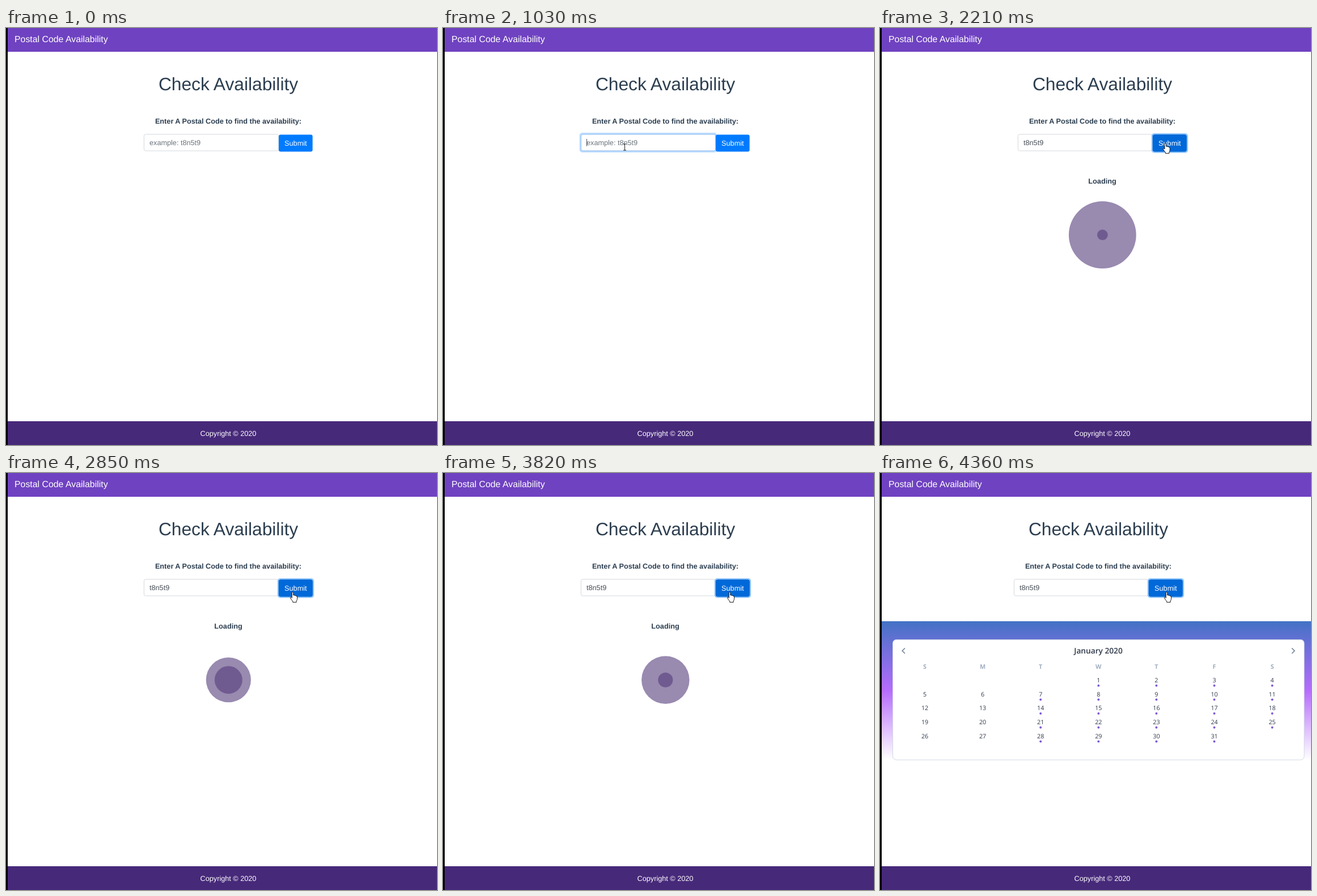
Recreate the animation shown at these times as an HTML page with a canvas. Size 760 by 737 pixels, loop 4410 ms.

```html
<!DOCTYPE html>
<html lang="en">
<head>
<meta charset="utf-8">
<title>Postal Code Availability</title>
<style>
  html, body { margin: 0; width: 100%; height: 100%; overflow: hidden; background: #fff; }
  canvas { display: block; }
</style>
</head>
<body>
<canvas id="stage" width="760" height="737"></canvas>
<script>
const ctx = document.getElementById('stage').getContext('2d');
const LOOP = 4410;
const ZOOM = 0.793;
const SANS = '"Liberation Sans", Arial, sans-serif';
const CALENDAR_FONT = '"Open Sans", "Noto Sans", sans-serif';
const INK = '#2c3e50';
const CODE = 't8n5t9';

// Moments of the story, in ms
const FOCUS = 640, TYPE = 1060, KEY = 42, LEAVE = 1310, PRESS = 1790, LOAD = 1922, RESULT = 3822;

const clamp = v => Math.min(1, Math.max(0, v));
const ramp = (t, a, b) => clamp((t - a) / (b - a));
const mix = (a, b, p) => a + (b - a) * p;
const smooth = p => p * p * (3 - 2 * p);

// CSS ease-in-out: cubic-bezier(.42, 0, .58, 1)
function easeInOut(x) {
  let lo = 0, hi = 1, s = 0.5;
  for (let i = 0; i < 20; i++) {
    s = (lo + hi) / 2;
    const bx = 1.26 * s * (1 - s) ** 2 + 1.74 * s * s * (1 - s) + s ** 3;
    if (bx < x) lo = s; else hi = s;
  }
  return s * s * (3 - 2 * s);
}

function rect(x, y, w, h, color) {
  ctx.fillStyle = color;
  ctx.fillRect(x, y, w, h);
}

function roundBox(x, y, w, h, r, fill, stroke, line = 1) {
  ctx.beginPath();
  ctx.roundRect(x, y, w, h, r);
  if (fill) { ctx.fillStyle = fill; ctx.fill(); }
  if (stroke) { ctx.strokeStyle = stroke; ctx.lineWidth = line; ctx.stroke(); }
}

function circle(x, y, r, color) {
  ctx.fillStyle = color;
  ctx.beginPath();
  ctx.arc(x, y, r, 0, Math.PI * 2);
  ctx.fill();
}

function text(str, x, y, size, color, { weight = 400, align = 'center', family = SANS } = {}) {
  ctx.font = `${weight} ${size}px ${family}`;
  ctx.textAlign = align;
  ctx.fillStyle = color;
  ctx.fillText(str, x, y);
}

function polyline(points, color, width) {
  ctx.beginPath();
  points.forEach(([x, y]) => ctx.lineTo(x, y));
  ctx.strokeStyle = color;
  ctx.lineWidth = width;
  ctx.stroke();
}

function drawFrame() {
  rect(0, 0, 760, 737, '#fff');
  rect(3, 0, 757, 42, '#6f42c1');
  text('Postal Code Availability', 15, 25, 20 * ZOOM, '#fff', { align: 'left' });
  rect(3, 695, 757, 42, '#47297a');
  text('Copyright © 2020', 392, 721, 16 * ZOOM, '#fff');
  rect(0, 0, 3, 737, '#000');
}

function drawInput(t, x) {
  const focus = ramp(t, FOCUS, FOCUS + 140) * (1 - ramp(t, PRESS, PRESS + 140));
  if (focus) roundBox(x - 2.4, 185.1, 242.8, 34.8, 5, `rgba(0,123,255,${0.25 * focus})`);
  roundBox(x + 0.4, 187.9, 237.2, 29.2, 3, '#fff', '#ced4da', 0.9);
  if (focus) roundBox(x + 0.4, 187.9, 237.2, 29.2, 3, null, `rgba(128,189,255,${focus})`, 0.9);

  const typed = CODE.slice(0, Math.max(0, Math.floor((t - TYPE) / KEY)));
  text(typed || 'example: ' + CODE, x + 10, 207, 16 * ZOOM, typed ? '#495057' : '#6c757d', { align: 'left' });
  if (t > FOCUS && t < PRESS) {
    rect(x + 10 + (typed ? ctx.measureText(typed).width : 0), 196, 1, 13, '#495057');
  }
}

function drawButton(t, x, hover) {
  const focus = ramp(t, PRESS, PRESS + 140);
  if (focus) roundBox(x - 2.3, 186, 64.4, 34.8, 5, `rgba(38,143,255,${0.5 * focus})`);
  roundBox(x, 188.4, 59.6, 30, 3.2, hover ? '#0069d9' : '#007bff');
  if (hover) roundBox(x + 0.4, 188.8, 58.8, 29.2, 3, null, '#0062cc', 0.8);
  text('Submit', x + 29.8, 207.5, 16 * ZOOM, '#fff');
}

function drawForm(t, hover) {
  const shift = t < RESULT ? 0 : -7;
  text('Check Availability', 392 + shift, 110, 40 * ZOOM, INK);
  text('Enter A Postal Code to find the availability:', 392 + shift, 169, 16 * ZOOM, INK, { weight: 700 });
  drawInput(t, 243 + shift);
  drawButton(t, 481 + shift, hover);
}

// The second disc rests at full size until its one second delay is over
function drawLoader(t) {
  const age = t < 2210 ? t - LOAD : t < 2720 ? mix(288, 1340, ramp(t, 2210, 2720)) : t - 1380;
  const bounce = ms => {
    const phase = (ms / 1050) % 2;
    return easeInOut(phase < 1 ? phase : 2 - phase);
  };
  text('Loading', 392, 275, 16 * ZOOM, INK, { weight: 700 });
  for (const scale of [bounce(age), age < 1000 ? 1 : bounce(age - 1000)]) {
    circle(392.3, 365.7, 59.4 * scale, 'rgba(86,61,124,.6)');
  }
}

function drawCalendar(t) {
  const glow = ctx.createLinearGradient(0, 262, 0, 507);
  glow.addColorStop(0, '#4372c4');
  glow.addColorStop(0.5, '#b66cfc');
  glow.addColorStop(1, '#fff');
  rect(3, 262, 757, 245, glow);
  roundBox(22.5, 294.5, 725.5, 212.5, 6.3, '#fff', '#cbd5e0', 0.9);

  const style = { family: CALENDAR_FONT };
  text('January 2020', 385, 319, 13.7, '#2d3748', { ...style, weight: 600 });
  polyline([[44, 309.5], [39.2, 314.2], [44, 319]], '#718096', 1.6);
  polyline([[726.2, 309.5], [731, 314.2], [726.2, 319]], '#718096', 1.6);

  const column = c => 79 + 102.1 * c;
  [...'SMTWTFS'].forEach((d, c) => text(d, column(c), 345.5, 10.8, '#a0aec0', { ...style, weight: 700 }));
  for (let day = 1; day <= 31; day++) {
    const cell = day + 2, c = cell % 7, y = 366 + 24.65 * Math.floor(cell / 7);
    text(day, column(c), y + 4, 10.7, '#2d3748', { ...style, weight: 500 });
    if (c >= 2) circle(column(c), y + 9.8, 2, '#805ad5');
  }
  const veil = 1 - ramp(t, RESULT, RESULT + 538);
  rect(3, 262, 757, 250, `rgba(255,255,255,${veil})`);
}

const CURSORS = {
  arrow: 'M0 0V13L3 10.3L5 15L7 14.2L5 9.6H9.3Z',
  hand: 'M-1.3 1.6Q-1.2 .5 0 .5Q1.2 .5 1.3 1.6V6Q3 5.3 3.7 6.6Q5.3 6 6 7.4Q8 7 8 9V12.5' +
        'Q8 14.5 6.6 16.2V18.4H.2V16.8Q-2 14.5-3.9 11Q-4.4 9.5-3.2 9.2Q-2.3 9.2-1.3 10.8Z'
};

function drawCursor({ kind, x, y }) {
  ctx.save();
  ctx.translate(x, y);
  if (kind === 'beam') {
    rect(0, -5.5, 1, 11, '#222');
    for (const end of [-6, 5]) rect(-2, end, 5, 1, '#222');
  } else {
    const shape = new Path2D(CURSORS[kind]);
    ctx.fillStyle = '#fff';
    ctx.strokeStyle = '#000';
    ctx.lineWidth = 0.9;
    ctx.lineJoin = 'round';
    ctx.fill(shape);
    ctx.stroke(shape);
  }
  ctx.restore();
}

function pointerAt(t) {
  if (t < 30) return null;
  if (t < 570) {
    const p = smooth(ramp(t, -10, 520));
    return { kind: 'arrow', x: mix(686, 307, p), y: mix(732, 218, p) };
  }
  if (t < LEAVE) {
    const p = ramp(t, 540, 630);
    return { kind: 'beam', x: mix(310, 320, p), y: mix(215, 210.5, p) };
  }
  const p = smooth(ramp(t, LEAVE, 1580));
  const x = mix(320, 503.2, p);
  if (x < 481) return { kind: 'beam', x, y: 210.5 + 8 * Math.sin(Math.PI * p) };
  const drift = ramp(t, 2260, 2650);
  return { kind: 'hand', x: x + 2.3 * drift, y: mix(206, 203.2, ramp(t, 1500, 1590)) + 6.8 * drift };
}

function draw(t) {
  ctx.textRendering = 'geometricPrecision';
  const pointer = pointerAt(t);
  drawFrame();
  drawForm(t, pointer?.kind === 'hand');
  if (t >= RESULT) drawCalendar(t);
  else if (t >= LOAD) drawLoader(t);
  if (pointer) drawCursor(pointer);
}

const start = performance.now();
function tick() {
  draw((performance.now() - start) % LOOP);
  requestAnimationFrame(tick);
}
tick();
</script>
</body>
</html>
```
